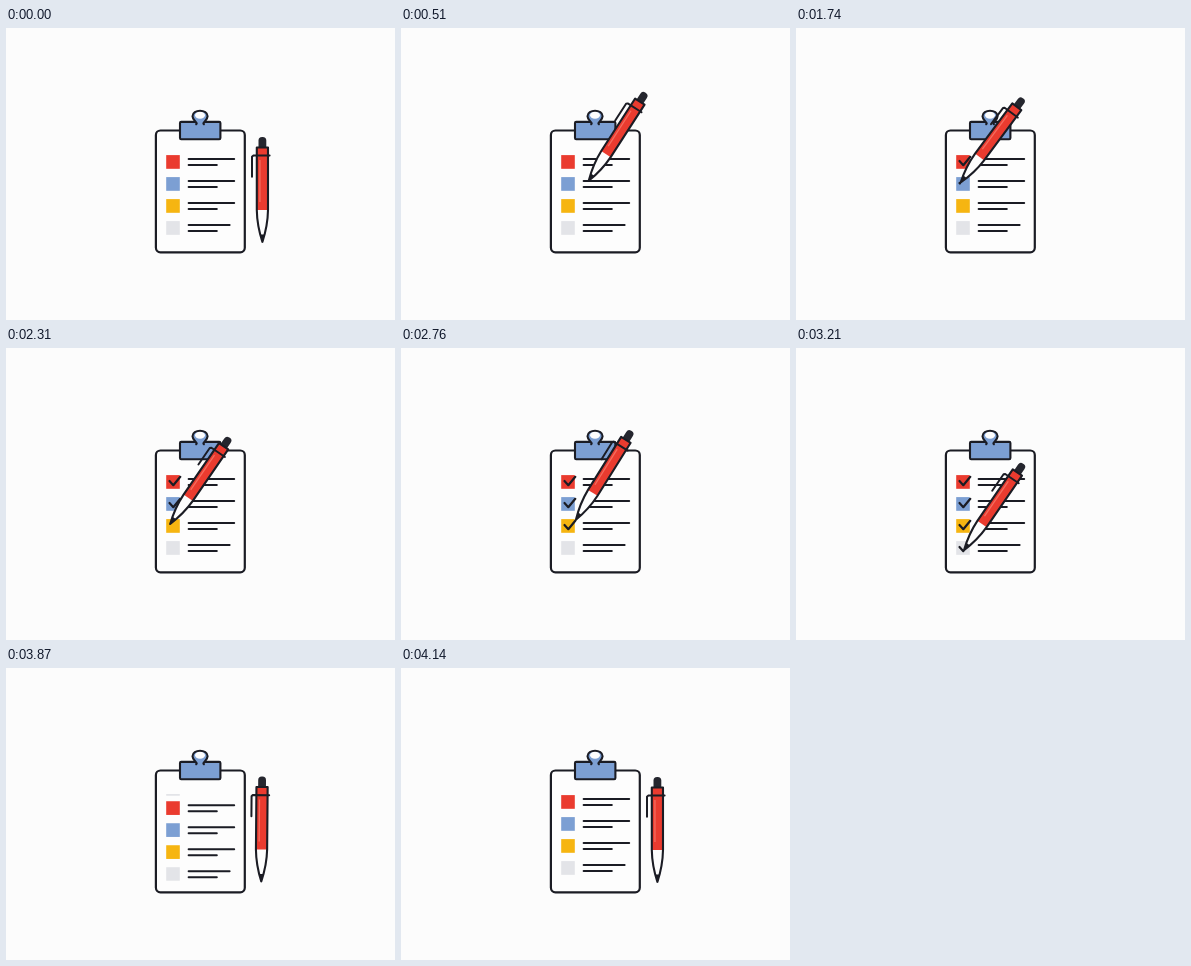
Animation of 389 by 292 pixels, one loop 4500 ms. Source, as an HTML page with a canvas:

```html
<!DOCTYPE html>
<html lang="en">
<head>
<meta charset="utf-8">
<title>Checklist</title>
<style>
  html, body { margin: 0; width: 100%; height: 100%; overflow: hidden; background: #fcfcfc; }
  canvas { display: block; width: 389px; height: 292px; }
</style>
</head>
<body>
<canvas id="stage"></canvas>
<script>
const W = 389, H = 292, LOOP = 4500;
const INK = '#1b1c24', RED = '#ea3b2f', BLUE = '#7c9fd3', PAPER = '#fdfdfd';
const ROW_COLORS = [RED, BLUE, '#f6b511', '#e3e4e8'];
const ROW_Y = 134, ROW_GAP = 22, SCROLL = 88;

const canvas = document.getElementById('stage');
const ctx = canvas.getContext('2d');
const dpr = window.devicePixelRatio || 1;
canvas.width = Math.round(W * dpr);
canvas.height = Math.round(H * dpr);

// When each tick begins, reaches its corner and ends, with the pen's tilt there
const TICKS = [
  { times: [1050, 1170, 1400], tilt: [44, 42.7, 32] },
  { times: [1680, 1880, 2130], tilt: [36, 41, 32] },
  { times: [2320, 2500, 2740], tilt: [34.5, 40, 32] },
  { times: [3060, 3210, 3400], tilt: [33.5, 34.5, 34] }
];
const TICK_SHAPE = [[163.5, -1], [167.3, 3.2], [174.3, -5.2]];

const REST = { x: 256.4, y: 215, a: 0 };
const poses = [{ t: 0, ...REST }, { t: 850, x: 163.5, y: 133, a: 44 }];
TICKS.forEach(({ times, tilt }, row) => {
  TICK_SHAPE.forEach(([x, dy], k) => {
    poses.push({ t: times[k], x, y: ROW_Y + row * ROW_GAP + dy, a: tilt[k] });
  });
});
poses.push({ t: 3955, ...REST, lift: 5 }, { t: LOOP, ...REST });

const mix = (a, b, p) => a + (b - a) * p;
const clamp = v => Math.min(1, Math.max(0, v));
const ease = p => p < 0.5 ? 4 * p ** 3 : 1 - 4 * (1 - p) ** 3;
const span = (t, from, to) => ease(clamp((t - from) / (to - from)));

function penPose(t) {
  const i = Math.max(1, poses.findIndex(p => p.t > t));
  const a = poses[i - 1], b = poses[i];
  const p = span(t, a.t, b.t);
  return {
    x: mix(a.x, b.x, p),
    y: mix(a.y, b.y, p) - (b.lift || 0) * Math.sin(Math.PI * p),
    a: mix(a.a, b.a, p)
  };
}

function line(points, width) {
  ctx.beginPath();
  points.forEach(([x, y]) => ctx.lineTo(x, y));
  ctx.lineWidth = width;
  ctx.stroke();
}

function box(x, y, w, h, r, fill, width) {
  ctx.beginPath();
  ctx.roundRect(x, y, w, h, r);
  ctx.fillStyle = fill;
  ctx.fill();
  ctx.lineWidth = width;
  ctx.stroke();
}

function drawBoard() {
  box(149.9, 102.5, 88.9, 121.8, 4.5, PAPER, 2.2);
  box(174, 93.9, 40.4, 17.3, 1.2, BLUE, 2.1);
  ctx.beginPath();
  ctx.moveTo(190.2, 96.2);
  ctx.bezierCurveTo(192.5, 95, 186.6, 93, 186.5, 88.3);
  ctx.bezierCurveTo(186.5, 81, 201.6, 81, 201.6, 88.3);
  ctx.bezierCurveTo(201.5, 93, 195.6, 95, 197.9, 96.2);
  ctx.fillStyle = BLUE;
  ctx.fill();
  ctx.lineWidth = 2.1;
  ctx.stroke();
  ctx.beginPath();
  ctx.ellipse(194, 87.2, 5, 3.5, 0, 0, Math.PI * 2);
  ctx.fillStyle = PAPER;
  ctx.fill();
}

function drawTick(cy, first, second) {
  if (first <= 0) return;
  const [a, b, c] = TICK_SHAPE.map(([x, dy]) => [x, cy + dy]);
  const along = (p, q, k) => [mix(p[0], q[0], k), mix(p[1], q[1], k)];
  const path = [a, along(a, b, first)];
  if (second > 0) path.push(along(b, c, second));
  line(path, 2.2);
}

function drawRows(offset, t) {
  ROW_COLORS.forEach((color, row) => {
    const cy = ROW_Y + row * ROW_GAP + offset;
    ctx.fillStyle = color;
    ctx.fillRect(160.2, cy - 6.9, 13.6, 13.7);
    line([[182.6, cy - 2.9], [row === 3 ? 223.6 : 228.2, cy - 2.9]], 2);
    line([[182.6, cy + 3], [210.8, cy + 3]], 2);
    if (t === undefined) return;
    const [start, corner, end] = TICKS[row].times;
    drawTick(cy, span(t, start, corner), span(t, corner, end));
  });
}

function drawList(t) {
  const out = SCROLL * span(t, 3400, 4067);
  const next = SCROLL * (1 - span(t, 3377, 4044));
  ctx.save();
  ctx.beginPath();
  ctx.rect(155, 126, 80, 86.8);
  ctx.clip();
  drawRows(-out, t);
  if (next < SCROLL) drawRows(next);
  ctx.restore();
}

function penBody() {
  ctx.beginPath();
  ctx.moveTo(-5.6, -95.5);
  ctx.lineTo(5.6, -95.5);
  ctx.lineTo(5.6, -33);
  ctx.bezierCurveTo(5.4, -20, 2.6, -9, 0, -1.2);
  ctx.bezierCurveTo(-2.6, -9, -5.4, -20, -5.6, -33);
  ctx.closePath();
}

// Local axes: tip at the origin, barrel pointing up
function drawPen({ x, y, a }) {
  ctx.save();
  ctx.translate(x, y);
  ctx.rotate(a * Math.PI / 180);
  ctx.beginPath();
  ctx.roundRect(-3.9, -106, 7.8, 12, [3.6, 3.6, 0, 0]);
  ctx.fillStyle = '#25262e';
  ctx.fill();

  ctx.save();
  penBody();
  ctx.clip();
  ctx.fillStyle = PAPER;
  ctx.fillRect(-7, -97, 14, 97);
  ctx.fillStyle = RED;
  ctx.fillRect(-7, -97, 14, 64);
  ctx.fillStyle = '#f46d5f';
  ctx.fillRect(-3.1, -83, 1.3, 42);
  ctx.fillStyle = INK;
  ctx.fillRect(-5, -8.5, 10, 9);
  ctx.restore();

  penBody();
  ctx.lineWidth = 2.1;
  ctx.stroke();
  line([[7.2, -87.4], [-9.2, -87.4], [-10.4, -86.2], [-10.4, -66.2]], 2);
  ctx.restore();
}

function draw(t) {
  ctx.setTransform(dpr, 0, 0, dpr, 0, 0);
  ctx.fillStyle = '#fcfcfc';
  ctx.fillRect(0, 0, W, H);
  ctx.strokeStyle = INK;
  ctx.lineCap = ctx.lineJoin = 'round';
  drawBoard();
  drawList(t);
  drawPen(penPose(t));
}

const began = performance.now();
function tick() {
  draw((performance.now() - began) % LOOP);
  requestAnimationFrame(tick);
}
tick();
</script>
</body>
</html>
```
